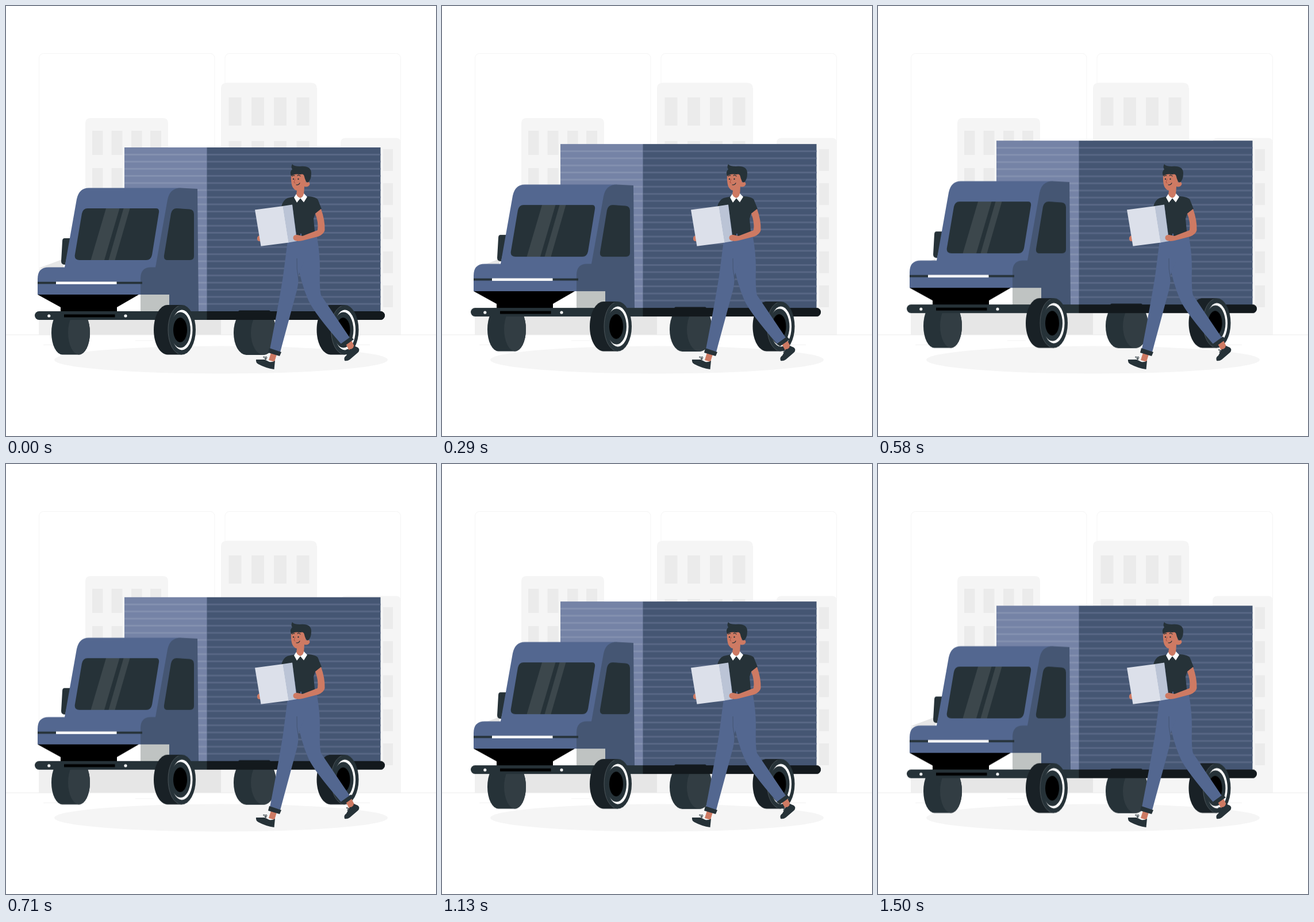
An HTML page without scripts that plays this animation: 748x748 px, repeating every 1540 ms.

```html
<!DOCTYPE html>
<html lang="en">
<head>
<meta charset="utf-8">
<title>Delivery truck</title>
<style>
  html, body { margin: 0; width: 100%; height: 100%; overflow: hidden; background: #fff; }
  svg { display: block; width: 100vw; height: 100vh; }
  .blue { fill: #536790; }
  .shade { fill: #455673; }
  .dark { fill: #263238; }
  .skin { fill: #ce7a63; }
  .white { fill: #fff; }
  .wall { fill: #f5f5f5; }
  .panes { fill: none; stroke: #ebebeb; }
  .frame { fill: #fff; stroke: #f5f5f5; }
  .detail { fill: none; stroke: #263238; stroke-linecap: round; }

  /* 24 fps bounce: up, turn, down */
  #truck { animation: bounce 1540ms -5ms infinite; }
  @keyframes bounce {
    0% { transform: translateY(0); animation-timing-function: steps(17); }
    45.95% { transform: translateY(-14.3px); animation-timing-function: steps(1); }
    48.65% { transform: translateY(-14.2px); animation-timing-function: steps(18); }
    97.3%, 100% { transform: translateY(.5px); animation-timing-function: steps(1); }
  }
</style>
</head>
<body>
<svg viewBox="0 0 748 748">
  <defs>
    <g id="wheel">
      <path fill="#192126" d="M281 520H306V606.500H281C268 606 257 588 257 563.500S268 520 281 520Z"/>
      <ellipse class="dark" cx="306" cy="563.300" rx="24" ry="43.200"/>
      <path fill="none" stroke="#6b7377" stroke-width=".6" d="M300 522C276 532 276 594 300 605"/>
      <ellipse class="white" cx="306" cy="563.500" rx="18.500" ry="35"/>
      <ellipse class="dark" cx="303.500" cy="563.500" rx="17.500" ry="31"/>
      <ellipse cx="303" cy="563.500" rx="12" ry="21.500"/>
    </g>
  </defs>

  <g id="city">
    <rect class="frame" x="57.500" y="82.500" width="305.500" height="423" rx="8"/>
    <rect class="frame" x="381" y="82.500" width="305.500" height="423" rx="8"/>
    <path class="wall" d="M138 460V204Q138 195 147 195H273Q282 195 282 204V460Z"/>
    <path class="panes" stroke-width="42" d="M150 238h18.500m15 0h19m15.500 0h18.500m14.500 0h19M150 303h18.500m15 0h19m15.500 0h18.500m14.500 0h19"/>
    <path class="wall" d="M374 572V144Q374 133.500 384.500 133.500H531Q541 133.500 541 144V572Z"/>
    <path class="panes" stroke-width="49" d="M387.500 183.500h22m17.500 0h22m17 0h22m17.500 0h22M387.500 259.500h22m17.500 0h22m17 0h22m17.500 0h22"/>
    <path class="wall" d="M582 572V238.500Q582 229.500 591 229.500H678Q687 229.500 687 238.500V572Z"/>
    <path class="panes" stroke-width="17" stroke-dasharray="38 21.250" d="M664.500 249V524"/>
    <path fill="#f0f0f0" d="M57 458L100 440V572H57Z"/>
    <path fill="#e6e6e6" d="M57 456L100 440V456ZM100 500H374V572H100Z"/>
    <path stroke="#ebebeb" d="M0 572H748"/>
    <path stroke="#f2f2f2" d="M65 589.500H140M225 582H257M590 589.500H633"/>
  </g>
  <ellipse class="wall" cx="374" cy="615.500" rx="290" ry="24"/>

  <g id="truck">
    <rect class="dark" x="79" y="530" width="67" height="76.500" rx="19" ry="38"/>
    <ellipse cx="127" cy="568.200" rx="19" ry="38.200" fill="#323d43"/>
    <rect class="dark" x="396" y="530" width="74" height="77" rx="22" ry="38"/>
    <ellipse cx="448" cy="568.500" rx="22" ry="38.500" fill="#323d43"/>

    <path fill="#7583a6" d="M206 246H350V531H206Z"/>
    <path class="shade" d="M349.500 246H651.500V531H349.500Z"/>
    <g fill="none" stroke-dasharray="3 9.370">
      <path stroke="#8491b0" stroke-width="143.500" d="M277.750 257V522"/>
      <path stroke="#586785" stroke-width="302" d="M500.500 257V522"/>
    </g>

    <rect class="dark" x="50" y="531" width="609" height="15" rx="7.500"/>
    <path fill="#13191d" d="M349.500 531H651.500A7.500 7.500 0 0 1 651.500 546H349.500Z"/>
    <path fill="#13191d" d="M404 531l2-1.500H458l2 1.500Z"/>

    <path class="dark" d="M102 404H113L103 450Q96 450 96 444L98 409Q98 404 102 404Z"/>
    <path class="white" d="M55 500H236V531H55Z"/>
    <path class="blue" d="M144 316.500H304L262 502H55V475Q55 454.500 74 454.500H102L123 336Q127 316.500 144 316.500Z"/>
    <path class="shade" d="M304 316.500L333 318L335 531H284V502H234V474Q234 454.500 252 454.500H260L281 337Q285 316.500 304 316.500Z"/>
    <path fill="#bfc3c2" d="M234 502H284V531H234Z"/>
    <path class="dark" d="M142 352H261Q267 352 266 359L254 433Q252 442 244 442H128Q118 442 120 432L132 361Q134 352 142 352Z"/>
    <path fill="#3c474c" d="M174 352H197.500L171 442H147.500ZM204.500 352H215.500L189.500 442H178.500Z"/>
    <path class="dark" d="M297 352L319 353.500Q327 354 327 362V435Q327 442 320 442H281Q274 442 275 434L287 361Q289 352 297 352Z"/>
    <path class="dark" d="M55 479.800H237V483.500H55Z"/>
    <path class="white" d="M87 479.500H192.500V484H87Z"/>
    <path d="M55 502H231L193 524V531H95V524ZM101 536.500H189.500V541.500H101Z"/>
    <circle class="white" cx="74.800" cy="539" r="2.600"/>
    <circle class="white" cx="208" cy="539" r="2.600"/>
    <use href="#wheel"/>
    <use href="#wheel" x="283.500"/>
  </g>

  <g id="courier">
    <path class="skin" d="M591 588L601 582L607 594L597 599ZM461 603L471 606L467 619L457 616Z"/>
    <path class="dark" d="M589 617Q587 611 592 608L598 597Q604 597 605 591L612 594Q617 598 612 603L598 615Q594 618 589 617Z"/>
    <path class="dark" d="M435 615H450L458 619Q464 620 468 617L466.500 632Q452 630 439 623Q434 620 435 615Z"/>
    <path class="detail" d="M452 615q-6-5-4-5q4 0 4 5q-2-5 1-5q2 1-1 5M597 600q-5 0-5-2q2-2 5 2q-4 1-3 3q2 1 3-3"/>

    <path class="blue" d="M506 406L541 402Q546 430 546 456Q545 493 548 503L598 577L583 588Q536 534 526 512Q512 480 506 440Z"/>
    <path class="blue" d="M490 408L535 404L508 470Q510 482 504 502L477 602L459 597Q474 520 482 470Z"/>
    <path fill="none" stroke="#455673" d="M506 439Q505 458 509 476"/>
    <path class="dark" d="M458 595L479 602L476 609L456 603ZM582 588L600 575L605 580L588 592Z"/>

    <path class="dark" d="M504 331L490 334Q482 337 479 349L498 346L506 403L538 402L535 370L538 361L549 353L543 338Q541 332 524 331Z"/>
    <path fill="none" stroke="#536790" stroke-width="2" d="M513 396V402"/>
    <path class="skin" d="M441 399Q436 401 437 406Q438 410 443 409Z"/>
    <path fill="#dce0ea" d="M433 354.500L482 348L492 411.500L443.500 417.800Z"/>
    <path fill="#bbc4d6" d="M481.500 348L498 345.500L506 409L491.500 411.600Z"/>
    <path class="skin" d="M538 361L548 353Q555 372 554.500 390Q553 397 543 401L516 408Q501 411 499.500 404Q499 398 506 398L516 400L542 390Q544 377 538 361Z"/>

    <path class="skin" d="M496 290Q495 312 500 317Q502 320 506 321L505 329Q511 339 518 329L519 314Q526 316 528.500 310Q528 304 522 307L519 290Z"/>
    <path class="white" d="M505 327L501 333L506 342L512 334.500L518 341.500L524 332L518 326Q518 331 512 334Q506 332 505 327Z"/>
    <path class="dark" d="M498 275Q500 279 511 279Q531 277 531 291Q531 303 525 307Q521 306 519 297Q518 291 512 293Q501 291 496 296Q493 288 498 284Q495 280 498 275Z"/>
    <g class="detail">
      <path stroke-width="1.200" d="M498 296q2-2 4-1M507 295q3-2 5 1M505 311q4 1 6-3"/>
      <path stroke="#a94f42" d="M503 301L501 307L503 308"/>
    </g>
    <circle class="dark" cx="500" cy="301" r="1.200"/>
    <circle class="dark" cx="508.500" cy="301" r="1.200"/>
  </g>
</svg>
</body>
</html>
```
